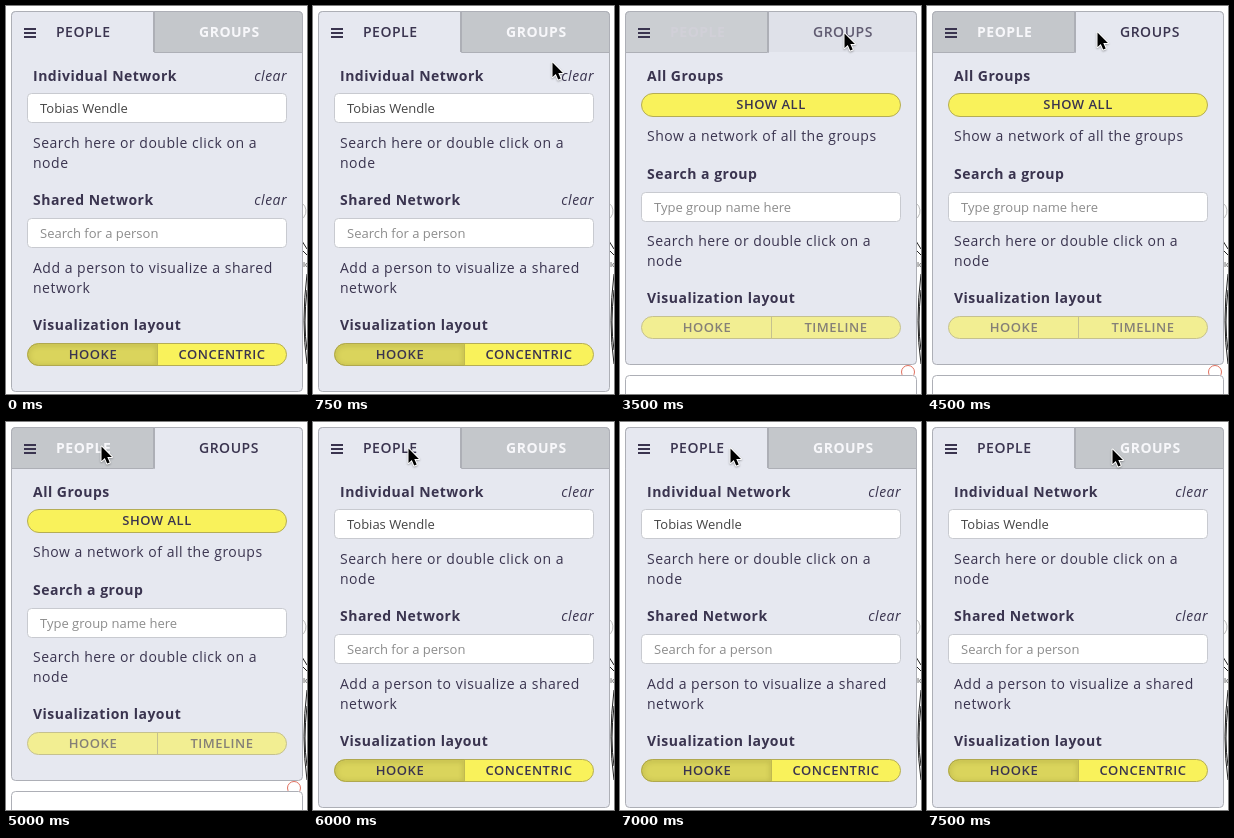
These frames come from a looping animation (301 by 388 pixels, 8 s). An HTML page with a canvas:

```html
<!DOCTYPE html>
<html lang="en">
<head>
<meta charset="utf-8">
<title>Network panel tabs</title>
<style>
html, body { margin: 0; width: 100%; height: 100%; overflow: hidden; background: #fff; }
canvas { display: block; width: 301px; height: 388px; }
</style>
</head>
<body>
<canvas id="stage" width="301" height="388"></canvas>
<script>
const ctx = document.getElementById('stage').getContext('2d');
const LOOP = 8000;
const INK = '#3a344f', BORDER = '#adafb6', PANEL = '#e6e8f0', TAB = '#c4c7cb';

// [start ms, x, y] of the pointer; it jumps between these spots.
const POINTER = [
  [500, 277, 73], [750, 238, 55], [1000, 233, 30], [1250, 223, 26],
  [4500, 169, 25], [4750, 106, 23], [5000, 94, 23], [6000, 94, 25],
  [7000, 109, 25], [7250, 153, 25], [7500, 184, 26]
];

function text(str, x, y, { size = 14, weight = 400, color = INK, spacing = 0.5, style = 'normal', align = 'left' } = {}) {
  ctx.font = `${style} ${weight} ${size}px "Open Sans", sans-serif`;
  ctx.letterSpacing = spacing + 'px';
  ctx.textAlign = align;
  ctx.fillStyle = color;
  ctx.fillText(str, x, y);
}

function box(x, y, w, h, radius, fill, stroke) {
  ctx.beginPath();
  ctx.roundRect(x + 0.5, y + 0.5, w - 1, h - 1, radius);
  ctx.fillStyle = fill;
  ctx.fill();
  ctx.lineWidth = 1;
  ctx.strokeStyle = stroke;
  ctx.stroke();
}

function mix(a, b, t) {
  const channels = c => [1, 3, 5].map(i => parseInt(c.slice(i, i + 2), 16));
  const from = channels(a), to = channels(b);
  return `rgb(${from.map((v, i) => Math.round(v + (to[i] - v) * t))})`;
}

const heading = (str, y) => text(str, 27, y, { weight: 700 });
const label = (str, x, y, color = INK) =>
  text(str, x, y, { size: 13, weight: 600, color, align: 'center' });
const clearLink = y => text('clear', 281, y, { style: 'italic', align: 'right' });

function hint(y, ...lines) {
  lines.forEach((line, i) => text(line, 27, y + i * 20));
}

function input(y, str, color) {
  box(21, y, 260, 30, 4, '#fff', '#c8cad0');
  text(str, 34, y + 20, { size: 13, spacing: 0, color });
}

function layoutButtons(y, second, enabled) {
  const edge = enabled ? '#b5ad55' : '#c5c18f';
  const color = enabled ? INK : '#858077';
  box(21, y, 260, 23, 11, enabled ? '#f9f25b' : '#f2ee92', edge);
  if (enabled) {
    ctx.save();
    ctx.beginPath();
    ctx.roundRect(21.5, y + 0.5, 130, 22, [11, 0, 0, 11]);
    ctx.fillStyle = '#dad45c';
    ctx.fill();
    ctx.clip();
    ctx.shadowColor = 'rgba(80,75,10,.6)';
    ctx.shadowBlur = 5;
    ctx.shadowOffsetY = 1;
    ctx.strokeStyle = '#9f984b';
    ctx.stroke();
    ctx.restore();
  } else {
    ctx.fillStyle = edge;
    ctx.fillRect(151, y + 1, 1, 21);
  }
  label('HOOKE', 87, y + 16, color);
  label(second, 216, y + 16, color);
}

function graph() {
  ctx.lineWidth = 1;
  ctx.strokeStyle = '#bbb';
  ctx.beginPath();
  ctx.arc(290, 205, 10, -0.9, 0.9);
  ctx.stroke();
  ctx.strokeStyle = '#222';
  ctx.beginPath();
  ctx.moveTo(296, 235);
  ctx.lineTo(301, 243);
  ctx.moveTo(296, 244);
  ctx.lineTo(301, 249);
  ctx.moveTo(301, 268);
  ctx.quadraticCurveTo(295, 316, 301, 358);
  ctx.moveTo(301, 284);
  ctx.quadraticCurveTo(297, 318, 301, 344);
  ctx.stroke();
  text('lo', 297, 261, { size: 8, spacing: 0, color: '#333' });
}

function tab(name, x, textX, left, activeness) {
  ctx.beginPath();
  ctx.roundRect(x + 0.5, 5.5, left ? 142 : 148, 41, left ? [4, 0, 0, 0] : [0, 4, 0, 0]);
  ctx.fillStyle = mix(TAB, PANEL, activeness);
  ctx.fill();
  ctx.strokeStyle = BORDER;
  ctx.stroke();
  if (activeness > 0.5) {
    ctx.fillStyle = PANEL;
    ctx.fillRect(x + 1, 46, left ? 142 : 147, 2);
  }
  text(name, textX, 31, {
    weight: activeness > 0.5 ? 600 : 700,
    color: mix('#f7f7fa', INK, activeness)
  });
}

function peopleContent() {
  heading('Individual Network', 75);
  clearLink(75);
  input(87, 'Tobias Wendle', '#444');
  hint(142, 'Search here or double click on a', 'node');
  heading('Shared Network', 199);
  clearLink(199);
  input(212, 'Search for a person', '#8c8c8c');
  hint(267, 'Add a person to visualize a shared', 'network');
  heading('Visualization layout', 324);
  layoutButtons(337, 'CONCENTRIC', true);
}

function groupsContent() {
  heading('All Groups', 75);
  box(21, 87, 260, 24, 12, '#f9f25b', '#b5ad55');
  label('SHOW ALL', 151, 103);
  hint(135, 'Show a network of all the groups');
  heading('Search a group', 173);
  input(186, 'Type group name here', '#8c8c8c');
  hint(240, 'Search here or double click on a', 'node');
  heading('Visualization layout', 297);
  layoutButtons(310, 'TIMELINE', false);
}

function pointer(x, y) {
  ctx.save();
  ctx.translate(x + 1.5, y + 1.5);
  ctx.beginPath();
  [[0, 0], [0, 14.5], [3.3, 11.4], [5.7, 17], [8.2, 16], [5.8, 10.5], [10.4, 10.5]]
    .forEach(([px, py]) => ctx.lineTo(px, py));
  ctx.closePath();
  ctx.shadowColor = 'rgba(0,0,0,.3)';
  ctx.shadowBlur = 2;
  ctx.shadowOffsetY = 1;
  ctx.lineJoin = 'round';
  ctx.lineWidth = 2;
  ctx.strokeStyle = '#fff';
  ctx.stroke();
  ctx.shadowColor = 'transparent';
  ctx.fillStyle = '#000';
  ctx.fill();
  ctx.restore();
}

function draw(time) {
  const groups = time >= 3500 && time < 6000;
  const fading = time >= 3500 && time < 3750;
  const amount = fading ? 0.8 : 1;
  const groupsActive = groups ? amount : 0;

  ctx.fillStyle = '#fff';
  ctx.fillRect(0, 0, 301, 388);
  graph();
  if (groups) {
    ctx.beginPath();
    ctx.arc(288, 366, 6.5, 0, 7);
    ctx.strokeStyle = '#e0705f';
    ctx.stroke();
    box(5, 369, 292, 40, 4, '#fff', BORDER);
  }
  box(5, 5, 292, groups ? 354 : 381, 4, PANEL, BORDER);
  tab('PEOPLE', 5, 50, true, 1 - groupsActive);
  tab('GROUPS', 148, 193, false, groupsActive);

  ctx.fillStyle = INK;
  for (let i = 0; i < 3; i++) ctx.fillRect(18, 22 + i * 4, 12, 2);

  if (groups) groupsContent();
  else peopleContent();

  const spot = POINTER.filter(([start]) => start <= time).pop();
  if (spot) pointer(spot[1], spot[2]);
}

function frame() {
  draw(performance.now() % LOOP);
  requestAnimationFrame(frame);
}
frame();
</script>
</body>
</html>
```
